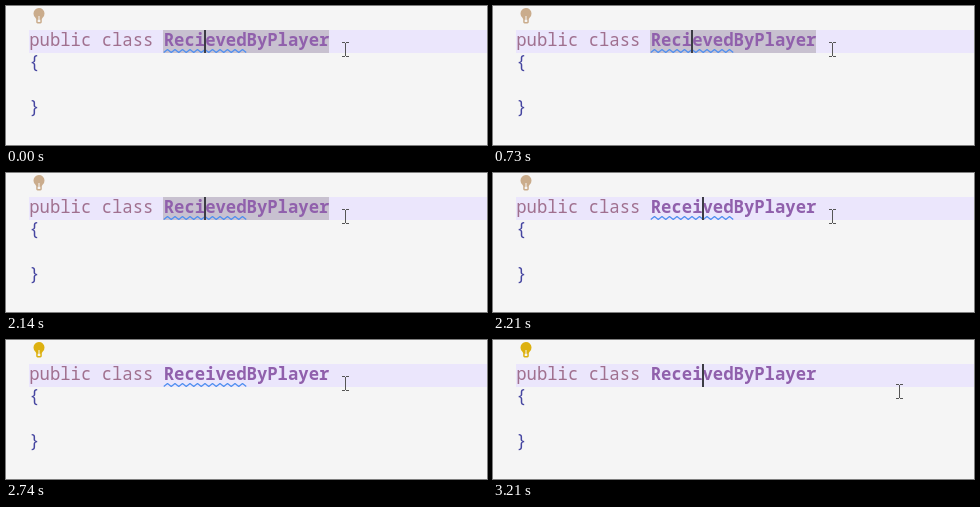
An HTML page with a canvas for the animation above (3.54 s loop, 481 by 139 pixels).

```html
<!DOCTYPE html>
<html lang="en">
<head>
<meta charset="utf-8">
<title>Spelling quick fix</title>
<style>
  html, body { margin: 0; width: 100%; height: 100%; overflow: hidden; background: #f5f5f5; }
  canvas { display: block; width: 481px; height: 139px; }
</style>
</head>
<body>
<canvas id="stage"></canvas>
<script>
const W = 481, H = 139, LOOP = 3540;
const MONO = '"Noto Sans Mono", "DejaVu Sans Mono", monospace';
const SANS = '"Open Sans", "Noto Sans", sans-serif';
const SIZE = 17.25, COL = SIZE * 0.6, LEFT = 23.2;
const LINE_TOP = 24, LINE_H = 23, BASE = 40;
const PAPER = '#f5f5f5', ACTIVE = '#ebe6fc';
const TAN = [202, 172, 140], YELLOW = [221, 177, 16];

const canvas = document.getElementById('stage');
const ctx = canvas.getContext('2d');
const dpr = window.devicePixelRatio || 1;
canvas.width = Math.round(W * dpr);
canvas.height = Math.round(H * dpr);

const colX = n => LEFT + n * COL;
const between = (t, a, b) => t >= a && t < b;
const mix = (a, b, k) => `rgb(${a.map((v, i) => Math.round(v + (b[i] - v) * k)).join(',')})`;

function rect(x, y, w, h, color) {
  ctx.fillStyle = color;
  ctx.fillRect(x, y, w, h);
}

function text(str, x, y, font, color) {
  ctx.font = font;
  ctx.fillStyle = color;
  ctx.fillText(str, x, y);
}

function bulb(x, y, color, back) {
  ctx.fillStyle = color;
  ctx.beginPath();
  ctx.arc(x, y + 5.5, 5.5, Math.PI * 0.74, Math.PI * 2.26);
  ctx.lineTo(x + 2.8, y + 11);
  ctx.lineTo(x + 2.8, y + 14);
  ctx.quadraticCurveTo(x + 2.8, y + 15.4, x + 1.4, y + 15.4);
  ctx.lineTo(x - 1.4, y + 15.4);
  ctx.quadraticCurveTo(x - 2.8, y + 15.4, x - 2.8, y + 14);
  ctx.lineTo(x - 2.8, y + 11);
  ctx.closePath();
  ctx.fill();
  rect(x - 1.3, y + 11.8, 2.6, 2.2, back);
  rect(x - 0.5, y + 8, 1, 4, back);
}

function squiggle(x0, x1, y) {
  const half = 3.75;
  ctx.beginPath();
  ctx.moveTo(x0, y + 1.4);
  for (let x = x0 + half, up = true; x <= x1 + 0.5; x += half, up = !up) {
    ctx.lineTo(x, y + (up ? -1.4 : 1.4));
  }
  ctx.strokeStyle = '#4f8ff0';
  ctx.lineWidth = 1.3;
  ctx.lineJoin = 'round';
  ctx.stroke();
}

function ibeam(x, y) {
  const c = '#555';
  rect(x, y - 6, 1, 13, c);
  for (const edge of [y - 7, y + 7]) {
    rect(x - 3, edge, 3, 1, c);
    rect(x + 1, edge, 3, 1, c);
  }
}

function arrow(x, y) {
  const pts = [[0, 0], [0, 16], [3.7, 12.6], [6.1, 18], [8.6, 16.9], [6.2, 11.6], [11.3, 11.6]];
  ctx.beginPath();
  pts.forEach(([px, py]) => ctx.lineTo(x + px, y + py));
  ctx.closePath();
  ctx.fillStyle = '#fff';
  ctx.fill();
  ctx.strokeStyle = '#444';
  ctx.lineWidth = 1;
  ctx.lineJoin = 'miter';
  ctx.stroke();
}

function menu() {
  rect(198, 49, W - 198, H - 49, '#c6c4c8');
  rect(199, 50, W - 199, H - 50, PAPER);
  rect(199, 82, W - 199, 29, ACTIVE);
  text('Quick Fix...', 211, 73, `500 15.2px ${SANS}`, '#8c5a68');
  [['Received', '#806078', ACTIVE], ['Relieved', '#7a5064', PAPER]].forEach(([word, color, back], i) => {
    const y = 88.5 + i * 29;
    bulb(221, y, mix(YELLOW, YELLOW, 0), back);
    text(word, 238, y + 13, `14.8px ${SANS}`, color);
  });
}

function editor(t) {
  const fixed = t >= 2210;
  const name = colX(13);
  rect(0, 0, W, H, PAPER);
  rect(23, LINE_TOP, W - 23, LINE_H, ACTIVE);
  if (!fixed) rect(157, LINE_TOP, 166, LINE_H, '#c8c1d0');

  const plain = `300 ${SIZE}px ${MONO}`;
  text('public class', LEFT, BASE, plain, '#a0708f');
  text(fixed ? 'ReceivedByPlayer' : 'RecievedByPlayer', name, BASE,
    `bold ${SIZE}px ${MONO}`, '#9060ac');
  text('{', LEFT, 61.5, plain, '#4545a0');
  text('}', LEFT, 106.5, plain, '#4545a0');

  if (t < 2810) squiggle(name, colX(21), 45);

  const glow = t < 2470 ? 0 : t < 2540 ? 0.5 : 1;
  bulb(33, 2, mix(TAN, YELLOW, glow), PAPER);

  const caretOn = t < 200 || between(t, 730, 930) || between(t, 2140, 2740) || t >= 3210;
  if (caretOn) rect(fixed ? 209 : 198, LINE_TOP, 2, LINE_H, '#3c3c44');
}

function pointer(t) {
  if (between(t, 930, 2140)) return arrow(337.5, 43.5);
  // The pointer is sampled every 70 ms while it glides right.
  const p = Math.min(4, Math.max(0, Math.floor((t - 2740) / 70))) / 4;
  const k = p * p * (3 - 2 * p);
  ibeam(Math.round(339 + 67 * k), Math.round(43 + 8 * k));
}

function draw(t) {
  ctx.setTransform(dpr, 0, 0, dpr, 0, 0);
  editor(t);
  if (between(t, 930, 2140)) menu();
  pointer(t);
}

const start = performance.now();
function tick() {
  draw((performance.now() - start) % LOOP);
  requestAnimationFrame(tick);
}
tick();
</script>
</body>
</html>
```
